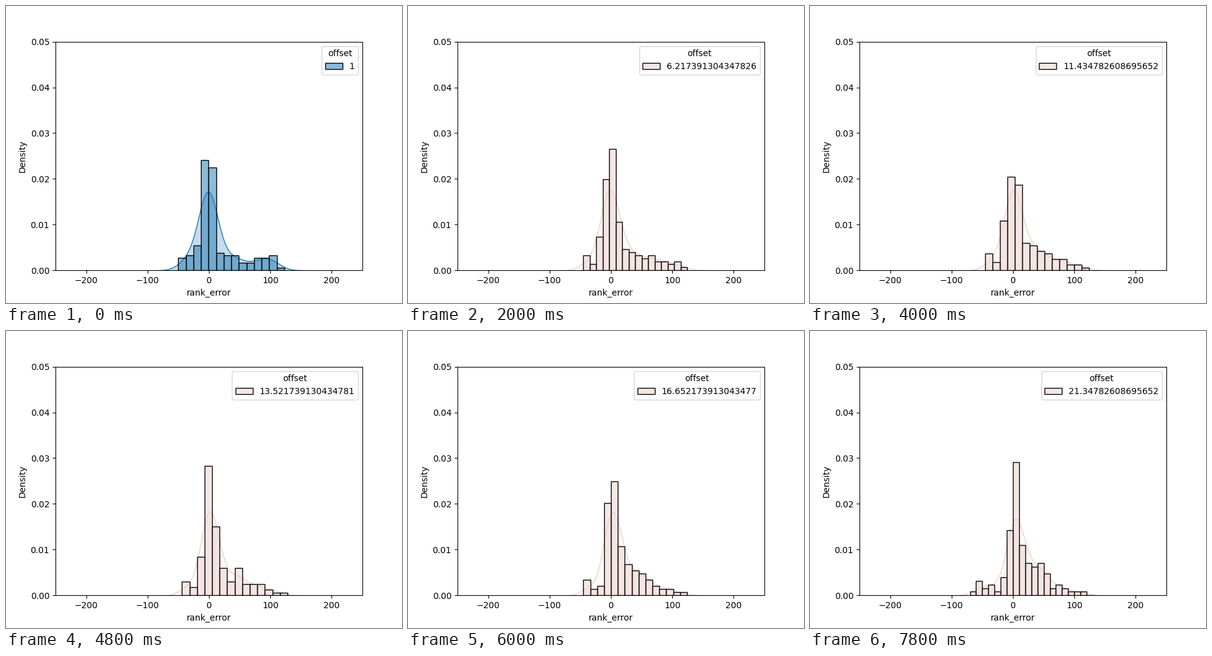
Write a matplotlib script that moves like this. It is 640x480 px and loops after 8 s.

```python
import numpy as np
import matplotlib.pyplot as plt
from matplotlib.animation import FuncAnimation
from matplotlib.patches import Patch

FRAMES, INTERVAL = 40, 200
STEP = 12 / 23
BLUE = (31 / 255, 119 / 255, 180 / 255)
PINK = (0.931, 0.820, 0.796)

# Range and bin number of the histogram at a few steps
STEPS = [0, 4, 10, 15, 24, 30, 39]
LOW = [-50, -48, -45, -47, -44, -45, -70]
HIGH = [123, 135, 124, 119, 128, 124, 130]
BINS = [14, 17, 16, 15, 14, 15, 20]

# Weight, mean and spread of each group of errors, first and last step
FIRST = np.array([(0.64, -2.5, 8.5), (0.07, -38, 8), (0.15, 30, 18), (0.14, 90, 18)])
LAST = np.array([(0.58, 4.0, 8.5), (0.09, -44, 12), (0.23, 38, 15), (0.10, 75, 30)])


def normal(x, mean, sd):
    return np.exp(-((x - mean) / sd) ** 2 / 2) / (sd * np.sqrt(2 * np.pi))


def sample(k):
    """Evenly spread quantiles of the mixture with a little seeded jitter."""
    t = k / (FRAMES - 1)
    low, high = (np.interp(k, STEPS, ends) for ends in (LOW, HIGH))
    x = np.linspace(low, high, 1000)
    pdf = sum(w * normal(x, m, s) for w, m, s in FIRST + t * (LAST - FIRST))
    cdf = np.cumsum(pdf) / pdf.sum()
    n = round(148 - 21 * t)
    values = np.interp((np.arange(n) + 0.5) / n, cdf, x)
    values += np.random.default_rng(k).normal(0, 3, n)
    values = np.clip(values, low, high)
    bins = round(np.interp(k, STEPS, BINS))
    return values, *np.histogram(values, bins, (low, high))


def density(values):
    n = len(values)
    bw = values.std(ddof=1) * n ** -0.2
    x = np.linspace(values.min() - 3 * bw, values.max() + 3 * bw, 200)
    return x, normal(x[:, None], values, bw).mean(axis=1)


fig, ax = plt.subplots(figsize=(6.4, 4.8), dpi=100)


def draw(k):
    ax.clear()
    color, fill, label = BLUE, 0.25, "1"
    if k:
        color, fill, label = PINK, 0.08, str(float(1 + k * STEP))
    values, counts, edges = sample(k)

    x, y = density(values)
    ax.fill_between(x, y, facecolor=(*color, fill), edgecolor=color, linewidth=1)
    widths = np.diff(edges)
    bar_style = dict(facecolor=(*color, 0.5), edgecolor="black", linewidth=1)
    ax.bar(edges[:-1], counts / (counts.sum() * widths), widths,
           align="edge", **bar_style)

    ax.set_xlim(-250, 250)
    ax.set_ylim(0, 0.05)
    ax.set_xlabel("rank_error")
    ax.set_ylabel("Density")
    ax.legend([Patch(**bar_style)], [label], title="offset", loc="upper right")
    return []


anim = FuncAnimation(fig, draw, frames=FRAMES, interval=INTERVAL,
                     repeat=True, repeat_delay=0)
plt.show()
```
